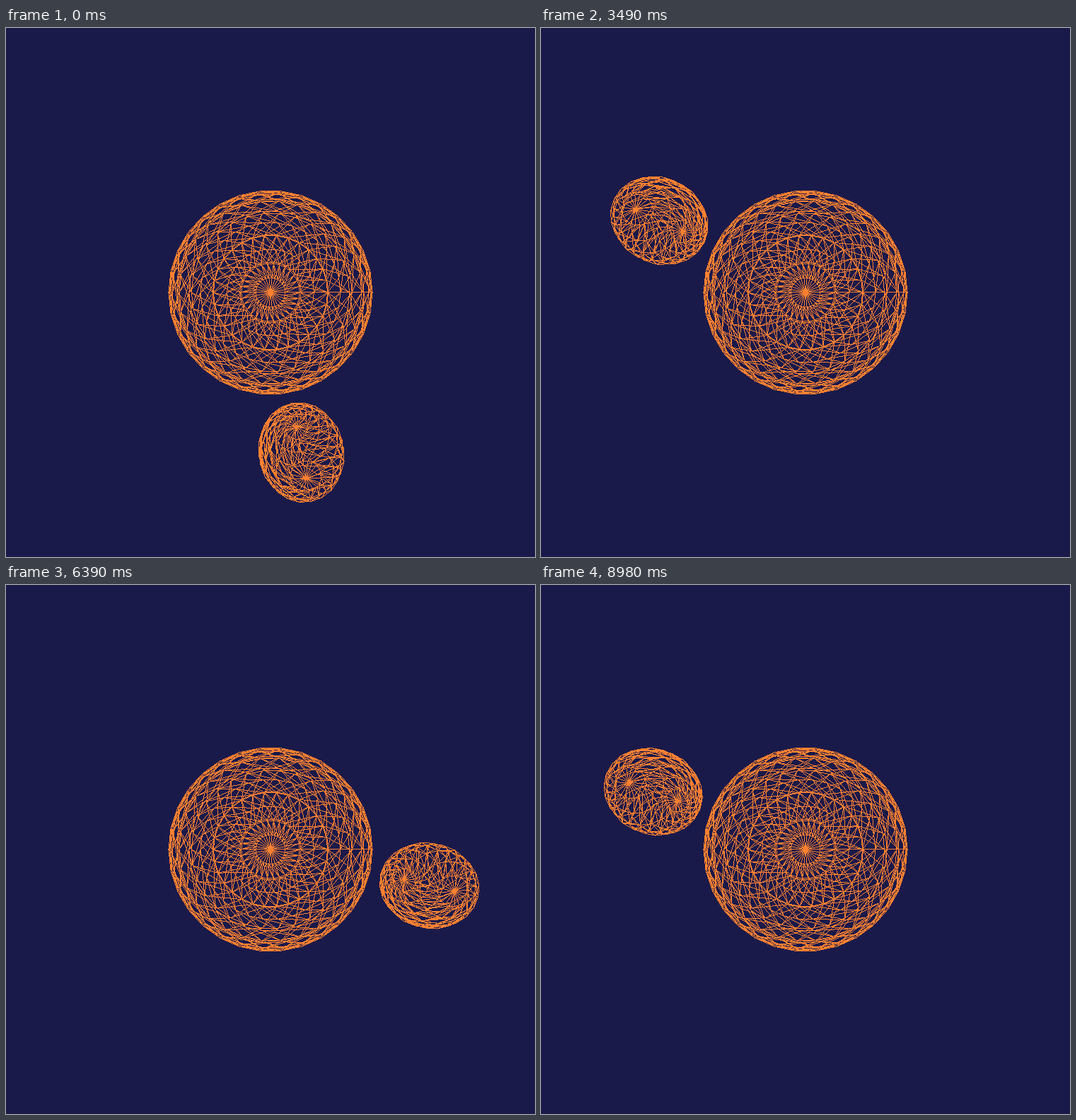
Write an HTML page with a canvas that moves like this. It is 748 by 748 pixels and loops after 9080 ms.

```html
<!DOCTYPE html>
<html lang="en">
<head>
<meta charset="utf-8">
<title>Wireframe orbit</title>
<style>
  html, body { margin: 0; width: 100%; height: 100%; overflow: hidden; background: #1a1a4a; }
  canvas { display: block; width: 748px; height: 748px; }
</style>
</head>
<body>
<canvas id="stage" width="748" height="748"></canvas>
<script>
const SIZE = 748;
const CENTER = SIZE / 2;
const FOCAL = SIZE / 2;        // 90 degree field of view
const LOOP = 9080;
const STEP = 53;               // average time between poses
const TURN = Math.PI * 2;

// All lengths are fractions of the camera distance.
const PLANET = { radius: 0.36, around: 30, rings: 15, orbit: 0 };
const MOON = { radius: 0.16, around: 20, rings: 10, orbit: 0.6 };

// Orbit angle in degrees at given times in ms
const PATH = [
  [0, 79.1], [980, 14.8], [2160, -64.9], [3490, -153.8],
  [5430, -283.1], [7390, -414.8], [8980, -519.2]
];

const ctx = document.getElementById('stage').getContext('2d');
const image = ctx.createImageData(SIZE, SIZE);
const pixels = new Uint32Array(image.data.buffer);

const rgb = (r, g, b) => ((255 << 24) | (b << 16) | (g << 8) | r) >>> 0;
const BACK = rgb(26, 26, 74);
const ORANGE = rgb(255, 128, 48);

// Hard-edged line, one pixel wide, sampled at pixel centres
function line([x0, y0], [x1, y1]) {
  const steep = Math.abs(y1 - y0) > Math.abs(x1 - x0);
  if (steep) [x0, y0, x1, y1] = [y0, x0, y1, x1];
  if (x0 > x1) [x0, y0, x1, y1] = [x1, y1, x0, y0];
  const slope = (y1 - y0) / (x1 - x0 || 1);
  for (let x = Math.ceil(x0 - 0.5); x + 0.5 < x1; x++) {
    const y = Math.floor(y0 + slope * (x + 0.5 - x0));
    pixels[steep ? x * SIZE + y : y * SIZE + x] = ORANGE;
  }
}

// Projected vertices, ring by ring from the near pole; each ring repeats its first vertex
function vertices({ radius, around, rings, orbit }, angle) {
  const points = [];
  for (let ring = 0; ring <= rings; ring++) {
    const polar = Math.PI * ring / rings;
    const flat = radius * Math.sin(polar);
    const scale = FOCAL / (1 - radius * Math.cos(polar));
    for (let i = 0; i <= around; i++) {
      const turn = angle - TURN * (i % around) / around;
      points.push([
        CENTER + scale * (orbit * Math.cos(angle) + flat * Math.cos(turn)),
        CENTER - 0.01 + scale * (orbit * Math.sin(angle) + flat * Math.sin(turn))
      ]);
    }
  }
  return points;
}

// The stride is one short of a full ring, which twists the mesh and leaves a straight seam.
function sphere(shape, angle) {
  const points = vertices(shape, angle);
  const stride = shape.around;
  const edge = (a, b) => b < points.length && line(points[a], points[b]);
  for (let k = 0; k < points.length - 1; k++) {
    edge(k, k + 1);
    edge(k, k + stride);
    edge(k + 1, k + stride);
  }
}

function orbitAngle(time) {
  let k = 0;
  while (k < PATH.length - 2 && time >= PATH[k + 1][0]) k++;
  const [t0, a0] = PATH[k];
  const [t1, a1] = PATH[k + 1];
  const steps = Math.round((t1 - t0) / STEP);
  const part = Math.min(1, Math.floor((time - t0) / (t1 - t0) * steps + 1e-6) / steps);
  return (a0 + (a1 - a0) * part) * Math.PI / 180;
}

// The planet never moves, so it is drawn once.
pixels.fill(BACK);
sphere(PLANET, 0);
const backdrop = pixels.slice();

const begin = performance.now();
let shown = null;

function draw() {
  const angle = orbitAngle((performance.now() - begin) % LOOP);
  if (angle !== shown) {
    shown = angle;
    pixels.set(backdrop);
    sphere(MOON, angle);
    ctx.putImageData(image, 0, 0);
  }
  requestAnimationFrame(draw);
}
draw();
</script>
</body>
</html>
```
